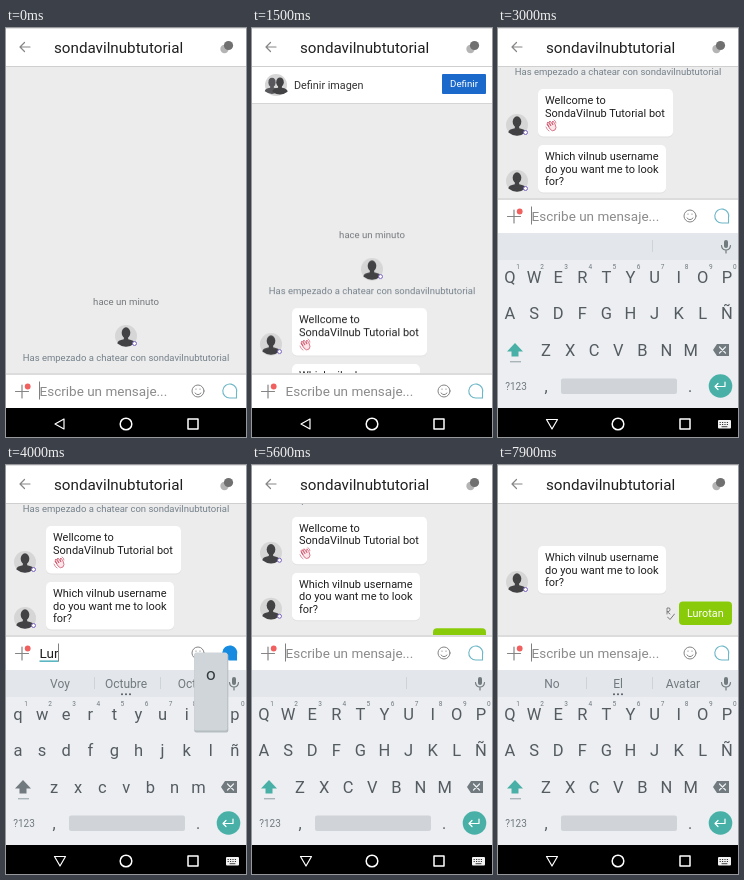
An HTML page that plays this animation: 240 px wide and 409 px high, repeating every 8 s.

```html
<!DOCTYPE html>
<html lang="es">
<head>
<meta charset="utf-8">
<title>Chat</title>
<style>
html, body { margin: 0; width: 100%; height: 100%; overflow: hidden; background: #ececec; }
svg { display: block; width: 100%; height: 100%; font-family: Roboto, "Noto Sans", sans-serif; }
.line { fill: none; stroke: #858585; stroke-width: 1.2; stroke-linecap: round; stroke-linejoin: round; }
.nav { stroke: #fff; stroke-width: 1.5; }
.mid { text-anchor: middle; }
#chat, #banner, #composer, #kb, #welcome, #cursor, #back, #hide, #tick, #tickEnd {
  animation: 8s infinite step-end;
}
#chat { animation-name: scroll; animation-timing-function: cubic-bezier(.65, 0, .35, 1); }
#banner { animation-name: banner; animation-timing-function: ease-in-out; }
#kb { animation-name: rise; animation-timing-function: linear; }
#composer { animation-name: lift; }
#welcome { animation-name: leave; }
#cursor { animation-name: blink; }
#back { animation-name: untilKeys; }
#hide { animation-name: withKeys; }
#tick { animation-name: tick; }
#tickEnd { animation-name: tickEnd; }
@keyframes scroll {
  0%, 10.625% { transform: translateY(0); }
  16.25%, 16.875% { transform: translateY(-55px); }
  21.875%, 29.99% { transform: translateY(-111px); }
  30%, 68% { transform: translateY(-286px); }
  73%, 100% { transform: translateY(-322px); }
}
@keyframes banner {
  0%, 6.25%, 37%, 100% { transform: translateY(-39px); }
  10%, 33.75% { transform: translateY(0); }
}
@keyframes rise {
  0%, 30% { transform: translateY(45px); opacity: 0; }
  31.25% { transform: translateY(28px); opacity: .52; }
  33.75%, 100% { transform: translateY(0); opacity: 1; }
}
@keyframes lift { 0% { transform: none; } 30%, 100% { transform: translateY(-175px); } }
@keyframes leave { 0% { opacity: 1; } 97.5% { opacity: .5; } 98.75%, 100% { opacity: 0; } }
@keyframes blink {
  0%, 7.5%, 20%, 30%, 80%, 92.5%, 100% { opacity: 1; }
  1.25%, 13.75%, 26.25%, 73.75%, 86.25% { opacity: 0; }
}
@keyframes untilKeys { 0% { opacity: 1; } 30%, 100% { opacity: 0; } }
@keyframes withKeys { 0% { opacity: 0; } 30%, 100% { opacity: 1; } }
@keyframes tick { 0% { opacity: 0; } 80%, 100% { opacity: 1; } }
@keyframes tickEnd { 0% { opacity: 0; } 82.5%, 100% { opacity: 1; } }
</style>
</head>
<body>
<svg id="stage" viewBox="0 0 240 409" preserveAspectRatio="none"></svg>
<script>
const BOT = 'sondavilnubtutorial', REPLY = 'Lurotan';
const INK = '#1f1f1f', KEY = '#545c61', SOFT = '#707a7f', TEAL = '#48b0a6', SEND = '#6cb6c6';

const text = (x, y, size, fill, str, attrs = '') =>
  `<text x="${x}" y="${y}" dy=".36em" font-size="${size}" fill="${fill}" ${attrs}>${str}</text>`;
const mid = (x, y, size, fill, str, attrs = '') => text(x, y, size, fill, str, `class="mid" ${attrs}`);
const rect = (x, y, w, h, fill, r = 0, attrs = '') =>
  `<rect x="${x}" y="${y}" width="${w}" height="${h}" rx="${r}" fill="${fill}" ${attrs}/>`;
const circle = (x, y, r, fill, attrs = '') => `<circle cx="${x}" cy="${y}" r="${r}" fill="${fill}" ${attrs}/>`;
const line = (d, attrs = '') => `<path class="line" d="${d}" ${attrs}/>`;
const at = (x, y, body) => `<g transform="translate(${x} ${y})">${body}</g>`;

const person = (x, fill, s = 1) => `<g transform="translate(${x} 0) scale(${s})" fill="${fill}">
  <ellipse cy="-3" rx="4" ry="5"/><path d="M-2 0H2V3Q8 4 8 7Q0 13-8 7Q-8 4-2 3Z"/></g>`;
const avatar = (x, y) => at(x, y, circle(0, 0, 11, '#d6d6d6') + person(0, '#424245', 1.08) +
  circle(8.5, 7.5, 2, '#fff', 'stroke="#7a62bd" stroke-width="1"'));

const bubble = (y, w, lines) => avatar(19, y + 36) +
  rect(40, y + .5, w, 48, '#e0e0e0', 5) + rect(40, y, w, 47.5, '#fff', 5) +
  lines.map((s, i) => text(47, y + 11 + i * 12.7, 11, INK, s)).join('');

const hand = (x, y) => at(x, y, `<path fill="#fbe6ea" stroke="#d0556d" stroke-width=".8" stroke-linejoin="round"
  d="M-4-2L-1 3Q1 6 4 4Q6 2 4-2L2-5L1-4L2-1L-1-5L-2-4L0 0L-3-4L-4-3L-2 1Z"/>` +
  line('M-5 1Q-4 4-2 5M3-6Q5-5 5-3', 'style="stroke:#d0556d;stroke-width:.7"'));

const chat = `<g id="chat">
  ${mid(120, 274, 9.6, '#74787c', 'hace un minuto')}
  ${avatar(120, 308)}
  ${mid(120, 330, 9.5, '#74808a', 'Has empezado a chatear con ' + BOT)}
  <g id="welcome">${bubble(347, 135, ['Wellcome to', 'SondaVilnub Tutorial bot'])}${hand(53, 384)}</g>
  ${bubble(403, 128, ['Which vilnub username', 'do you want me to look', 'for?'])}
  ${rect(181, 458.5, 53, 23.5, '#8acb09', 4)}
  ${mid(207.3, 470, 10.8, '#fff', REPLY)}
  <g id="tick">${line('M169 471V465H171.5Q173 467 171 468.5H169L172 471', 'style="stroke:#777;stroke-width:.9"')}
    <g id="tickEnd">${line('M169.5 474L172 476.5L176.5 471', 'style="stroke:#777;stroke-width:1"')}</g></g>
</g>`;

const banner = `<g id="banner">
  ${rect(0, 38, 240, 37, '#fff')}${rect(0, 75, 240, 1, '#d5d5d5')}
  ${at(24, 57, circle(0, 0, 11, '#d6d6d6') + person(-4, '#58585c', .9) + person(4, '#424245', .95))}
  ${text(42, 57, 10.8, '#333', 'Definir imagen')}
  ${rect(190, 46, 44, 20, '#1b6acb', 1)}${mid(212, 56, 9.7, '#fff', 'Definir')}
</g>`;

const header = rect(0, 0, 240, 38, '#fff') + rect(0, 0, 240, 1, '#e2e2e2') + rect(0, 38, 240, 1, '#cfcfcf') +
  line('M24 19H14M18.5 14.5L14 19L18.5 23.5') + text(48, 19.5, 15.2, INK, BOT) +
  circle(218.5, 21, 4.2, '#b4b4b4') + circle(222.5, 17.5, 4.6, '#707070');

const speech = 'M230.5 195H224A7 7 0 1 1 230.5 190Z';
const composer = `<g id="composer">
  ${rect(0, 345, 240, 2, '#dcdcdc')}${rect(0, 347, 240, 214, '#fff')}
  ${at(0, 175, `
    ${line('M9.5 188.5H22.5M16 182V195')}${circle(21.7, 183.5, 2.9, '#f0605f')}
    ${text(33.5, 188, 13.5, '#8b8b8b', 'Escribe un mensaje...', 'id="hint"')}
    ${text(33.5, 188, 13.5, INK, '', 'id="typed"')}
    ${rect(33.5, 195.5, 0, 1.3, '#35a6b4', 0, 'id="under"')}
    ${rect(33, 178.5, 1, 18, '#808080', 0, 'id="cursor"')}
    <circle class="line" cx="192" cy="188" r="6" style="stroke-width:1"/>
    ${line('M189 190Q192 193.5 195 190M190 186V186.3M194 186V186.3', 'style="stroke-width:1"')}
    <path id="send" d="${speech}" fill="none" stroke="${SEND}" stroke-width="1.1"/>`)}
</g>`;

const PITCH = 24.1;
const rows = [['qwertyuiop', 12, 249.5], ['asdfghjklñ', 12, 285.5], ['zxcvbnm', 48, 322]];
const keyPos = {};
const letters = rows.map(([row, x0, y]) => [...row].map((c, i) => {
  keyPos[c] = [x0 + PITCH * i, y];
  return mid(x0 + PITCH * i, y, 16.5, KEY, c.toUpperCase(), 'data-key="1"');
}).join('')).join('');
const digits = [...'1234567890'].map((c, i) => mid(20 + PITCH * i, 239, 6.5, SOFT, c)).join('');

const keyboard = `<g id="kb">
  ${rect(0, 205, 240, 175, '#eceef2')}${rect(0, 205, 240, 27, '#e3e6ea')}
  ${rect(154, 212, 1, 12, '#cdd3d6')}
  <g id="words">${rect(88, 212, 1, 12, '#cdd3d6')}
    ${[54, 120, 185].map(x => mid(x, 218.5, 12, SOFT, '', 'data-word="1"')).join('')}
    ${[116, 120, 124].map(x => circle(x, 229.3, 1, KEY)).join('')}</g>
  ${rect(226, 212, 4, 8, SOFT, 2)}${line('M223.5 217.5Q224 222 228 222T232.5 217.5M228 222V225', `style="stroke:${SOFT}"`)}
  ${letters}${digits}
  <path id="shift" d="M17 315L25 323.5H20.5V328.5H13.5V323.5H9Z"/>${rect(12, 333, 11, 1.4, '#a9b4b8')}
  <path d="M215 322L219 316H231V328H219Z" fill="${SOFT}"/>${line('M221.5 319L227.5 325M227.5 319L221.5 325', 'style="stroke:#eceff1"')}
  ${mid(18, 358, 10, SOFT, '?123')}${mid(48, 358, 16, KEY, ',')}${mid(192, 358, 16, KEY, '.')}
  ${rect(63, 350.5, 116, 15.5, '#d0d4d8', 2)}
  ${circle(222.5, 358, 11.8, TEAL)}${line('M227 354V358.5H217M220 355.5L217 358.5L220 361.5', 'style="stroke:#fff"')}
</g>`;

const popup = `<g id="popup">${rect(-16.5, -61, 34, 79, '#b6bdc1', 2)}${rect(-16.5, -62, 33, 78, '#cfd5d9', 2)}
  ${mid(0, -41, 17, '#333b40', '', 'id="popChar"')}</g>`;

const nav = line('M58 391V401L49 396Z', 'style="stroke:#fff" id="back"') +
  `<g id="hide">${line('M48.5 391.5H59.5L54 401Z', 'style="stroke:#fff"')}
    ${rect(220, 392, 13, 8.5, '#f2f2f2', 1)}
    ${line('M222 394.5H231M222 396.5H231', 'style="stroke:#333;stroke-width:1;stroke-dasharray:.4 2;"')}
    ${line('M224 398.7H229', 'style="stroke:#333;stroke-width:.9"')}</g>
  <circle class="line nav" cx="120" cy="396" r="5.8"/><rect class="line nav" x="182" y="391" width="10" height="10"/>`;

const $ = id => document.getElementById(id);
$('stage').innerHTML = rect(0, 0, 240, 409, '#ececec') + chat + banner + header + composer +
  rect(0, 380, 240, 29, '#000') + keyboard + popup + nav;

const keys = document.querySelectorAll('[data-key]');
const words = document.querySelectorAll('[data-word]');
const strokes = [3400, 3600, 3800, 4100, 4350, 4600, 4820];
const SENT = 5050, PRESS = 130;

function suggestions(t) {
  if (t >= 6000) return ['No', 'El', 'Avatar'];
  return t >= strokes[0] && t < SENT ? ['Voy', 'Octubre', 'Oct…'] : ['', '', ''];
}

function draw(t) {
  const count = t < SENT ? strokes.filter(s => s <= t).length : 0;
  const typing = count > 0;
  $('typed').textContent = REPLY.slice(0, count);
  const width = typing ? $('typed').getComputedTextLength() : 0;
  $('under').setAttribute('width', width);
  $('cursor').setAttribute('x', 33 + width);
  $('hint').style.opacity = typing ? 0 : 1;
  $('send').setAttribute('fill', typing ? '#168be0' : 'none');
  $('send').setAttribute('stroke', typing ? '#168be0' : SEND);

  keys.forEach(k => {
    k.textContent = typing ? k.textContent.toLowerCase() : k.textContent.toUpperCase();
  });
  $('shift').setAttribute('fill', typing ? SOFT : TEAL);

  const list = suggestions(t);
  words.forEach((w, i) => { w.textContent = list[i]; });
  $('words').style.opacity = list[0] ? 1 : 0;

  const pressed = strokes.findIndex(s => t >= s - PRESS && t < s);
  $('popup').style.opacity = pressed < 0 ? 0 : 1;
  if (pressed >= 0) {
    const c = REPLY[pressed];
    $('popup').setAttribute('transform', `translate(${keyPos[c.toLowerCase()]})`);
    $('popChar').textContent = c;
  }
}

const start = performance.now();
function tick() {
  draw((performance.now() - start) % 8000);
  requestAnimationFrame(tick);
}
tick();
</script>
</body>
</html>
```
